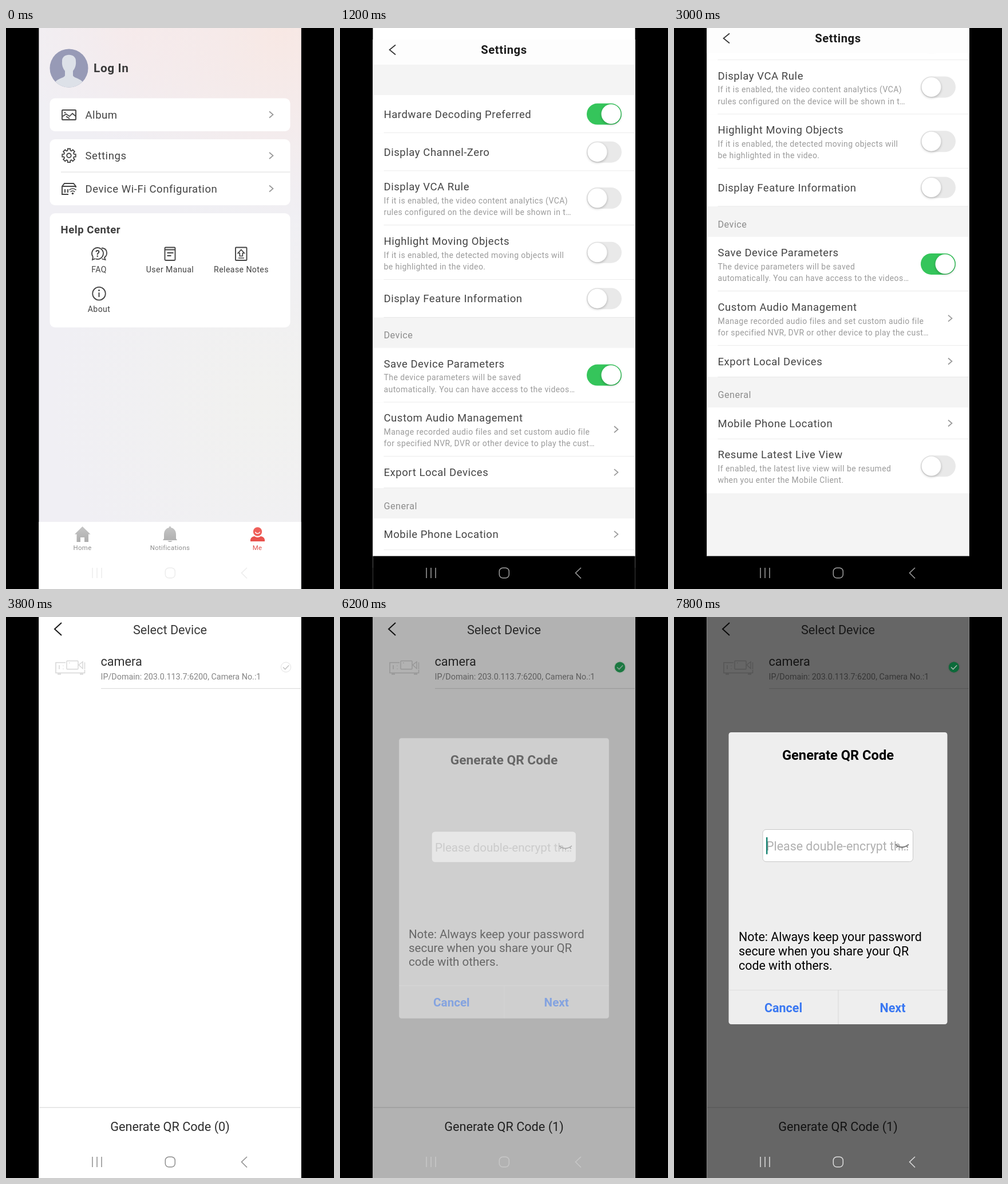
Animation, 573 px wide and 978 px high, one loop 8000 ms. Source, as an HTML page with a canvas:

```html
<!DOCTYPE html>
<html lang="en">
<head>
<meta charset="utf-8">
<title>App walkthrough</title>
<style>
html, body { margin: 0; width: 100%; height: 100%; overflow: hidden; background: #000; }
canvas { display: block; }
</style>
</head>
<body>
<canvas id="stage" width="573" height="978"></canvas>
<script>
const c = document.getElementById('stage').getContext('2d');
const L = 57, R = 516, W = R - L, H = 978, MID = 286.5;
const LOOP = 8000, STEP = 200;
const INK = '#444';

// ---------- helpers ----------
function text(s, x, y, size, color, { bold, align = 'left', gap = 0 } = {}) {
  c.font = `${bold ? 700 : 400} ${size}px Roboto, sans-serif`;
  c.letterSpacing = (size * gap).toFixed(3) + 'px';
  c.textAlign = align;
  c.fillStyle = color;
  c.fillText(s, x, y);
}
const wide = (s, x, y, size, color, opt) => text(s, x, y, size, color, { gap: 0.03, ...opt });

function rect(x, y, w, h, color) {
  c.fillStyle = color;
  c.fillRect(x, y, w, h);
}
function round(x, y, w, h, r, fill, stroke, lw = 1) {
  c.beginPath();
  c.roundRect(x, y, w, h, r);
  if (fill) { c.fillStyle = fill; c.fill(); }
  if (stroke) { c.strokeStyle = stroke; c.lineWidth = lw; c.stroke(); }
}
function disc(x, y, r, color) {
  c.beginPath();
  c.arc(x, y, r, 0, 7);
  c.fillStyle = color;
  c.fill();
}
function ring(x, y, r, color, lw, a = 0, b = 2 * Math.PI) {
  c.beginPath();
  c.arc(x, y, r, a, b);
  c.strokeStyle = color;
  c.lineWidth = lw;
  c.stroke();
}
function line(d, color, lw) {
  c.strokeStyle = color;
  c.lineWidth = lw;
  c.stroke(new Path2D(d));
}
function shape(d, color) {
  c.fillStyle = color;
  c.fill(new Path2D(d));
}
function at(x, y, draw) {
  c.save();
  c.translate(x, y);
  draw();
  c.restore();
}
function chevron(x, y) {
  line(`M${x - 3} ${y - 5.5}l6.5 5.5l-6.5 5.5`, '#999', 1.7);
}
function navIcons(color, lw = 1.5) {
  for (const x of [151, 159, 167]) line(`M${x} 941v18`, color, lw);
  round(278.3, 941.3, 17, 17.4, 6, null, color, lw);
  line('M421 941l-9.5 9l9.5 9.5', color, lw);
}

// ---------- profile page ----------
function glow(x, y, r, rgb, a) {
  const g = c.createRadialGradient(x, y, 0, x, y, r);
  g.addColorStop(0, `rgba(${rgb},${a})`);
  g.addColorStop(1, `rgba(${rgb},0)`);
  rect(L, 0, W, H, g);
}
function avatar() {
  c.save();
  c.beginPath();
  c.arc(110, 70, 33.5, 0, 7);
  c.clip();
  rect(76, 36, 68, 68, '#979ab6');
  shape('M98 58C97 43 123 43 122 58C123 68 118 73 117 75V83C120 89 136 87 138 104H82C84 87 100 89 103 83V75C102 73 97 68 98 58Z', '#dde1e8');
  c.restore();
}
function gear() {
  c.beginPath();
  for (let i = 0; i < 8; i++) {
    const a = i * Math.PI / 4 - Math.PI / 2;
    for (const [d, r] of [[-0.27, 9], [-0.19, 12], [0.19, 12], [0.27, 9]])
      c.lineTo(Math.cos(a + d) * r, Math.sin(a + d) * r);
  }
  c.closePath();
  c.strokeStyle = INK;
  c.lineWidth = 1.8;
  c.stroke();
  ring(0, 0, 3.8, INK, 1.8);
}
function rowIcons() {
  round(98, 143, 24, 17, 1, null, INK, 1.9);
  line('M99 154l6-4l6 4l5-5l6 5M105 154l6 4', INK, 1.7);
  disc(103, 147.5, 1.3, INK);
  at(110, 222.3, gear);
  line('M109 290H98V276L102 271H118L122 276V278M98 276H122M103 281v6M108 281v6', INK, 1.9);
  ring(116.5, 289, 5, INK, 1.7, -2.4, -0.74);
  ring(116.5, 289, 9, INK, 1.7, -2.3, -0.84);
  disc(116.5, 288.5, 1.8, INK);
}
function helpIcons() {
  ring(160, 393, 10, INK, 1.8, 2.5, 8.2);
  line('M152 399l-1 5l5-2M167 383.5C178 384 178 396 172 400l1.5 4l-6-1.5', INK, 1.8);
  text('?', 160, 399, 16, INK, { bold: true, align: 'center' });

  round(277.5, 382.5, 18, 22.5, 1.5, null, INK, 1.9);
  line('M278 386.5h18M281.5 392h11M281.5 397h7', INK, 1.8);

  round(401, 382.5, 19.5, 22.5, 1, null, INK, 1.9);
  line('M410.8 386.5l5.5 6h-3v5h-5v-5h-3zM406 401h10', INK, 1.7);

  ring(162.5, 463, 11.3, INK, 1.8);
  line('M162.5 461v8', INK, 2);
  disc(162.5, 457.5, 1.4, INK);
}
function tabs() {
  rect(L, 861, W, 117, '#fff');
  const g = c.createLinearGradient(0, 868, 0, 897);
  g.addColorStop(0, '#c6c6c6');
  g.addColorStop(1, '#adadad');
  shape('M133.5 869L147.5 882.5H144V896H137V888H130V896H123.5V882.5H120Z', g);
  shape('M285 869h3v2C294 872 297 877 297 883V890L299 893H274L276 890V883C276 877 279 872 285 871ZM282 894h9q-4.5 4-9 0Z', g);
  disc(439.5, 878, 7.7, '#ef5f59');
  ring(439.5, 877, 4.3, '#fff', 1.5, 0.35, 2.8);
  shape('M427 895V892Q428 887 434 886Q439.5 890 445 886Q451 887 452 892V895Z', '#e9524d');
  const opt = { align: 'center' };
  wide('Home', 133.5, 910, 11.4, '#8e8e8e', opt);
  wide('Notifications', MID, 909.5, 11.4, '#8e8e8e', opt);
  wide('Me', 439, 909.5, 11.4, '#e0504c', opt);
}
function profilePage() {
  rect(L, 0, W, H, '#f0eff4');
  glow(450, 650, 380, '241,241,239', 1);
  glow(480, 0, 330, '248,232,228', 1);
  glow(230, -20, 230, '247,233,233', 0.8);
  avatar();
  wide('Log In', 153, 77, 20.8, '#3a3a3a', { bold: true });

  for (const [y, h] of [[122.5, 57.5], [194, 115], [323, 199]]) round(76.5, y, 420, h, 9, '#fff');
  rect(96, 250.5, 400.5, 1.2, '#e2e2e2');
  rowIcons();
  [['Album', 151], ['Settings', 222.5], ['Device Wi-Fi Configuration', 280]].forEach(([s, y]) => {
    wide(s, 138.5, y + 6.7, 18.5, INK);
    chevron(463, y);
  });
  wide('Help Center', 95.5, 358, 18.5, '#3e3e3e', { bold: true });
  helpIcons();
  const opt = { align: 'center' };
  wide('FAQ', 162.5, 426, 14.1, INK, opt);
  wide('User Manual', MID, 426, 14.1, INK, opt);
  wide('Release Notes', 411, 426, 14.1, INK, opt);
  wide('About', 162.5, 495, 14.1, INK, opt);
  tabs();
}

// ---------- settings page ----------
const ON = 'on', OFF = 'off', GO = 'go', BAR = 'bar';
const rows = [
  [BAR, ''],
  [ON, 'Hardware Decoding Preferred'],
  [OFF, 'Display Channel-Zero'],
  [OFF, 'Display VCA Rule', 'If it is enabled, the video content analytics (VCA)', 'rules configured on the device will be shown in t…'],
  [OFF, 'Highlight Moving Objects', 'If it is enabled, the detected moving objects will', 'be highlighted in the video.'],
  [OFF, 'Display Feature Information'],
  [BAR, 'Device'],
  [ON, 'Save Device Parameters', 'The device parameters will be saved', 'automatically. You can have access to the videos…'],
  [GO, 'Custom Audio Management', 'Manage recorded audio files and set custom audio file', 'for specified NVR, DVR or other device to play the cust…'],
  [GO, 'Export Local Devices'],
  [BAR, 'General'],
  [GO, 'Mobile Phone Location'],
  [OFF, 'Resume Latest Live View', 'If enabled, the latest live view will be resumed', 'when you enter the Mobile Client.']
];

function toggle(y, on) {
  round(431, y - 18.5, 61, 37, 18.5, on ? '#35c55b' : '#e9e9e9');
  c.save();
  c.shadowColor = 'rgba(0,0,0,.25)';
  c.shadowBlur = 4;
  c.shadowOffsetY = 1.5;
  disc(on ? 473.5 : 449.5, y, 17, '#fff');
  c.restore();
}
function settingsPage(scroll) {
  rect(L, 0, W, 921, '#f4f4f4');
  let y = -15 - scroll;
  rows.forEach(([kind, title, a, b], i) => {
    if (kind === BAR) {
      rect(L, y, W, 53, '#f4f4f4');
      wide(title, 76.5, y + 36.5, 16.2, '#8c8c8c');
      y += 53;
      return;
    }
    const h = a ? 94.7 : kind === GO ? 55 : 66.1, mid = y + h / 2;
    rect(L, y, W, h, '#fff');
    wide(title, 76.5, a ? y + 33.9 : mid + 6.7, 18.5, INK);
    if (a) {
      wide(a, 76.5, y + 56.7, 14, '#9b9b9b');
      wide(b, 76.5, y + 76.9, 14, '#9b9b9b');
    }
    if (kind === GO) chevron(482, mid); else toggle(mid, kind === ON);
    y += h;
    if (i < rows.length - 1) rect(76.5, y - 0.6, R - 76.5, 1.2, '#dedede');
  });
  rect(L, 0, W, 44, '#fdfdfd');
  line('M97 9.5l-10.5 8.5l10.5 8.5', '#333', 1.7);
  text('Settings', MID, 25, 20.2, '#1c1c1c', { bold: true, align: 'center', gap: 0.03 });
}

// ---------- device page ----------
function tick(color) {
  line('M484 87.5l3.6 3.6l6.6-6.8', color, 1.5);
}
function checkMark(on) {
  if (on) {
    c.save();
    c.shadowColor = 'rgba(50,180,90,.45)';
    c.shadowBlur = 3;
    disc(489, 87.5, 9, '#3ec268');
    c.restore();
    tick('#fff');
  } else {
    ring(489, 87.5, 8.6, '#e2e2e2', 1);
    tick('#c4c4c4');
  }
}
function recorder() {
  const g = '#d6d6d6';
  line('M104 79.5H87V97.5H137.5V92M93 84v7M100 84.5v1M100 90v1', g, 1.5);
  line('M90 99.5h6M129 99.5h6', g, 2);
  round(106, 76.5, 20, 14.5, 1, null, g, 1.4);
  line('M127 83.5l7-5.5v12zM110 80h1.5M137.5 79v12', g, 1.4);
}
function devicePage(count, pressed) {
  rect(L, 0, W, H, '#fff');
  line('M97 10l-12 11l12 11', '#1a1a1a', 2);
  text('Select Device', MID, 29.5, 21.66, '#3a3a3a', { align: 'center' });
  recorder();
  text('camera', 165.5, 85, 21.66, '#333');
  text('IP/Domain: 203.0.113.7:6200, Camera No.:1', 165.5, 108.7, 14.33, '#858585');
  rect(166, 124, R - 166, 1.2, '#dcdcdc');
  checkMark(count > 0);
  rect(L, 854.5, W, 1.2, '#d9d9d9');
  text(`Generate QR Code (${count})`, MID, 896, 21.66, pressed ? '#c5191f' : '#2e2e2e', { align: 'center' });
}

// ---------- dialog ----------
function dialog(cursor) {
  round(95.5, 201, 382, 509, 4.5, '#eee');
  const mid = { bold: true, align: 'center' };
  text('Generate QR Code', MID, 248.8, 23.7, '#000', mid);
  round(155, 370.5, 262.5, 56, 6, '#fff', '#c2c2c2', 0.9);
  text('Please double-encrypt th…', 161, 407, 21.4, '#b0b0b0');
  line('M387 396.5Q398 406 410 396.5M391 399l-2.5 3M398.5 401v3M406 399l2.5 3', '#777', 1.7);
  if (cursor) rect(161, 384, 2.4, 29.5, '#12806f');
  ['Note: Always keep your password', 'secure when you share your QR', 'code with others.']
    .forEach((s, i) => text(s, 113, 564.5 + i * 25, 21.4, '#000'));
  rect(95.5, 650, 382, 1, '#dfdfdf');
  rect(286.5, 650, 1, 60, '#d8d8d8');
  text('Cancel', 191, 688.8, 21.5, '#3a78f2', mid);
  text('Next', 382, 688.8, 21.5, '#3a78f2', mid);
}

// ---------- timeline ----------
// Last value whose start time has passed.
const pick = (t, keys) => keys.reduce((v, [start, value]) => t >= start ? value : v, keys[0][1]);

function profileScene(t) {
  const leaving = t >= 1000;
  at(0, leaving ? -27 : 0, () => {
    profilePage();
    if (leaving) rect(L, 0, W, H, 'rgba(0,0,0,.087)');
  });
  if (leaving) navIcons('rgba(150,150,150,.5)', 2.6);
  navIcons(leaving ? '#f4f4f4' : '#ececec');
}
function settingsScene(t) {
  const scroll = pick(t, [[1200, -59], [2000, 0], [2200, 40], [2400, 114], [2600, 114.6]]);
  rect(L, 0, W, 921, '#fff');
  at(0, t < 1400 ? 20 : 0, () => settingsPage(scroll));
  rect(L, 920.6, W, H - 920, '#000');
  navIcons('#a0a0a0');
}
function deviceScene(t) {
  rect(L, 0, W, H, '#fff');
  at(0, pick(t, [[3400, 25], [3600, 0.5], [3800, 0]]), () =>
    devicePage(t >= 4800 ? 1 : 0, t >= 6000 && t < 6200));
  if (t < 6200) return navIcons('#8c8c8c');

  const k = t < 6400 ? 0.5 : 1;
  rect(L, 0, W, H, `rgba(0,0,0,${0.6 * k})`);
  c.save();
  c.globalAlpha = k;
  disc(489, 87.5, 9, '#0c6a3a');
  tick('#a4b8ac');
  navIcons('#dedede');
  const s = 0.92 + 0.08 * k;
  c.translate(MID, 455.5);
  c.scale(s, s);
  c.translate(-MID, -455.5);
  dialog(t >= 7800);
  c.restore();
}
function draw(t) {
  rect(0, 0, 573, H, '#000');
  c.save();
  c.beginPath();
  c.rect(L + 0.4, 0, W - 0.8, H);
  c.clip();
  if (t < 1200) profileScene(t);
  else if (t < 3400) settingsScene(t);
  else deviceScene(t);
  c.restore();
}

const begin = performance.now();
function frame() {
  const t = (performance.now() - begin) % LOOP;
  draw(Math.floor(t / STEP) * STEP);
  requestAnimationFrame(frame);
}
frame();
</script>
</body>
</html>
```
